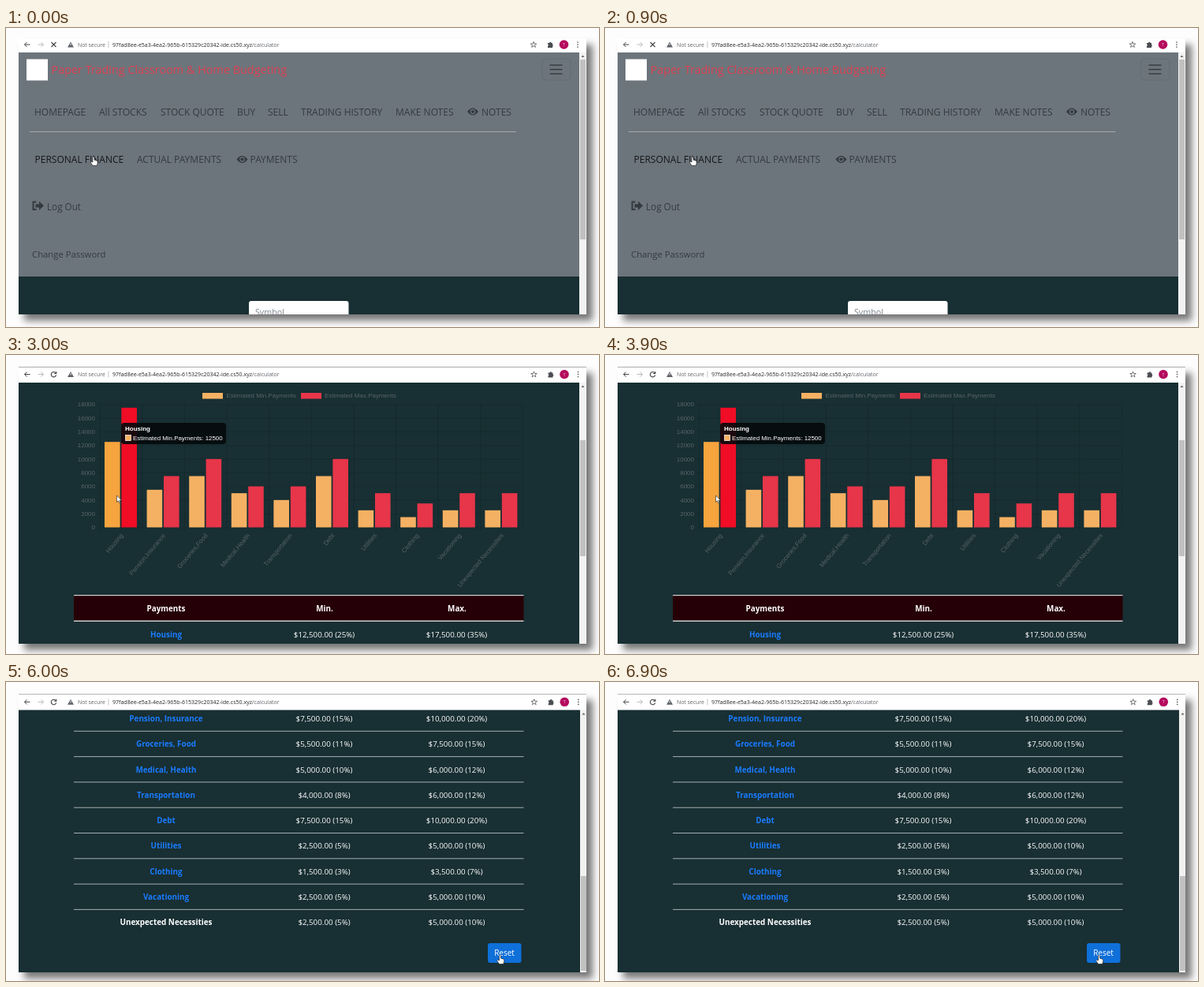
An HTML page that plays this animation: 752 by 379 pixels, repeating every 7.5 s.

```html
<!DOCTYPE html>
<html lang="en">
<head>
<meta charset="utf-8">
<title>Budget calculator walkthrough</title>
<style>
html, body { margin: 0; width: 100%; height: 100%; overflow: hidden; background: #fdfdfd; }
svg { display: block; width: 752px; height: 379px; font-family: "Open Sans", "Noto Sans", sans-serif; }
.scene { visibility: hidden; animation: show 7500ms step-end infinite; }
@keyframes show { 0% { visibility: visible } 20%, 100% { visibility: hidden } }
.chart { font-family: "Liberation Sans", Arial, sans-serif; font-size: 8px; }
.mid { text-anchor: middle; }
.end { text-anchor: end; }
.b { font-weight: 700; }
</style>
</head>
<body>
<svg id="stage" viewBox="0 0 752 379" xmlns="http://www.w3.org/2000/svg"></svg>
<script>
const DARK = '#182f33', GREY = '#6d757c', INK = '#343a40', BLUE = '#1a7cff';

const rect = (x, y, w, h, fill, extra = '') =>
  `<rect x="${x}" y="${y}" width="${w}" height="${h}" fill="${fill}" ${extra}/>`;
const text = (x, y, s, size, fill, cls = '', extra = '') =>
  `<text x="${x}" y="${y}" font-size="${size}" fill="${fill}" class="${cls}" ${extra}>${s}</text>`;
const stroke = (d, color, width = 1, extra = '') =>
  `<path d="${d}" fill="none" stroke="${color}" stroke-width="${width}" ${extra}/>`;
const at = (x, y, s) => `<g transform="translate(${x} ${y})">${s}</g>`;

const arrow = (x, y) => at(x, y,
  '<path d="M0 0V8.5L2 6.8L3.4 10L4.7 9.4L3.4 6.3H6Z" fill="#fff" stroke="#222" stroke-width=".6"/>');
const hand = (x, y) => at(x, y,
  '<path d="M-1 -5.5Q0 -6.6 1 -5.5V-1.8L4.5 -.8Q5.6 0 5.2 2L4.3 5.5H-1L-4 1Q-3.6 -.5 -1 1Z" fill="#fff" stroke="#222" stroke-width=".7"/>');
const eye = (x, y) => at(x, y,
  `<path d="M-7 0Q0 -9 7 0Q0 9 -7 0Z" fill="${INK}"/><circle r="3.2" fill="${GREY}"/><circle r="2.1" fill="${INK}"/>`);

// Browser toolbar: mid is its vertical centre, dx shifts the right-hand icons
function toolbar(mid, dx, loading) {
  const c = '#5f6368';
  const back = 'M3.5 0H-3.5M-.5 -3L-3.5 0L-.5 3';
  const reload = loading ? 'M-3 -3L3 3M3 -3L-3 3' : 'M2.5 -1.8A3.2 3.2 0 1 0 3.1 1M3.3 -3.6V-1H.7';
  return at(0, mid,
    at(27, 0, stroke(back, '#444')) +
    at(44, 0, `<g transform="scale(-1 1)">${stroke(back, '#b9bbbe')}</g>`) +
    at(60.5, 0, stroke(reload, '#444', 1.1)) +
    `<path d="M82 -3.6L86 3.4H78Z" fill="${c}"/>` + rect(81.6, -1.4, .9, 2.4, '#fff') +
    text(91, 2.5, 'Not secure', 6.9, c) + rect(129.6, -4, .7, 8, '#aaa') +
    text(135, 2.5, `97fad8ee-e5a3-4ea2-965b-615329c20342-ide.cs50.xyz<tspan fill="${c}">/calculator</tspan>`, 7.05, '#26282b') +
    at(dx, 0,
      stroke('M669 -3.6L670 -1H672.8L670.6 .7L671.4 3.4L669 1.8L666.6 3.4L667.4 .7L665.2 -1H668Z', '#555', .8) +
      '<path d="M687 -2H689A1.3 1.3 0 0 1 691.6 -2H693V0A1.3 1.3 0 0 1 693 2.4V4H687V2A1.3 1.3 0 0 0 687 -.4Z" fill="#4a4d51"/>' +
      '<circle cx="707.5" r="5.8" fill="#b40a5c"/>' + text(707.5, 2, 'T', 5.5, '#f3c4db', 'mid') +
      [-3, 0, 3].map(y => `<circle cx="725" cy="${y}" r=".85" fill="#555"/>`).join('')));
}

// Window frame: bar top, page top, page bottom, scrollbar thumb range
function page(id, o, body) {
  const { top, y, bottom, thumb, right = 727 } = o;
  return rect(23, top + 8, 721, bottom - top, '#333', 'filter="url(#soft)" opacity=".66"') +
    rect(16, top, 720, bottom - top, '#fff') +
    (o.edge || '') + toolbar(o.mid, o.dx || 0, o.loading) +
    `<clipPath id="p${id}">${rect(16, y, right - 16, bottom - y, '#000')}</clipPath>` +
    rect(16, y, right - 16, bottom - y, DARK) +
    `<g clip-path="url(#p${id})">${body}</g>` +
    rect(right, y, 736 - right, bottom - y, '#f2f2f2') +
    rect(right + 1, thumb[0], 7, thumb[1] - thumb[0], '#c1c1c1') +
    `<path d="M${right + 2.5} ${y + 6}h4l-2 -2.6Z" fill="#666"/>`;
}

function navbar(y, h) {
  const m = y + 21.5;
  return rect(16, y, 712, h, GREY) + rect(26, m - 13, 27, 27, '#fff') +
    text(57.5, m + 5, 'Paper Trading Classroom &amp; Home Budgeting', 14.4, '#dc3f51') +
    rect(680, m - 13.5, 36, 27, 'none', 'rx="4" stroke="#646c73"') +
    [-5.5, 0, 5.5].map(d => rect(689.5, m + d - .6, 16, 1.3, '#30363a')).join('');
}

function menuScene() {
  const item = (x, y, s, color = INK) => text(x, y, s, 12, color);
  const links = [[36, 'HOMEPAGE'], [118, 'All STOCKS'], [196, 'STOCK QUOTE'], [293, 'BUY'], [332, 'SELL'],
    [374, 'TRADING HISTORY'], [494, 'MAKE NOTES'], [603, 'NOTES']];
  return navbar(31, 284) +
    links.map(([x, s]) => item(x, 110.5, s)).join('') + eye(592, 106) +
    rect(30, 131, 617, 1, '#a3a8ac') +
    item(36.5, 171, 'PERSONAL FINANCE', '#14181b') + item(166, 171, 'ACTUAL PAYMENTS') +
    eye(299.5, 166.5) + item(309.5, 171, 'PAYMENTS') +
    stroke('M38.5 220.5H34.5V230H38.5', INK, 2) +
    `<path d="M37.5 223.2H42V219.6L48 225.3L42 231V227.4H37.5Z" fill="${INK}"/>` +
    text(52, 231, 'Log Out', 11.7, INK) + text(33, 290.5, 'Change Password', 11.3, INK) +
    rect(308, 346, 126.5, 26, '#fff', 'rx="3"') + text(316, 364, 'Symbol', 10.7, '#7b838a') +
    hand(111, 169);
}

// Coin pile: each band is [centre x, top, bottom, width]
function coins(bands) {
  const tones = ['#8a7a45', '#b3a36c', '#7a6a3c', '#9a8a5a'];
  const coin = (x, y, w, fill) =>
    rect(x, y, w, 4.6, fill, 'rx="2"') + rect(x, y, w, 4.6, 'url(#metal)', 'rx="2"');
  return bands.map(([cx, top, bottom, w]) => {
    let s = rect(cx - w / 2 + 2, top + 3, w - 4, bottom - top - 4, '#3f3821');
    for (let y = bottom - 5, i = 0; y >= top; y -= 5, i++)
      s += coin(cx - w / 2 + Math.sin(i * 2.3), y, w, tones[i % 4]);
    return s + `<ellipse cx="${cx}" cy="${top + 3}" rx="${w / 2}" ry="3" fill="#9d9162" stroke="#5b5130" stroke-width=".6"/>`;
  }).join('');
}

function photo() {
  let grid = '';
  for (let i = 0; i < 34; i++) grid += `M${172 + i * 13} 298L${20 + i * 21} 364`;
  for (let i = 0; i < 8; i++) grid += `M172 ${300 + i * 3 + i * i * .8}H568`;
  return `<clipPath id="ph">${rect(172, 121, 396, 243, '#000')}</clipPath><g clip-path="url(#ph)">` +
    rect(172, 121, 396, 243, 'url(#paper)') + stroke(grid, '#b8b0a6', .7, 'opacity=".45"') +
    '<ellipse cx="345" cy="336" rx="125" ry="12" fill="url(#shade)"/>' +
    coins([[284, 300, 335, 53], [285, 262, 302, 41], [281, 236, 262, 55],
      [371, 298, 335, 54], [369, 270, 300, 40], [437, 308, 334, 43], [435, 296, 310, 33], [437, 282, 297, 41]]) +
    '<ellipse cx="380" cy="266" rx="20" ry="5.5" fill="#8a7a4a" stroke="#4f4628" transform="rotate(-12 380 266)"/></g>';
}

function formScene() {
  const line = (y, s) => text(370.5, y, s, 10, '#24292d', 'mid');
  return navbar(33, 43) + photo() +
    line(168, "Personal finances and organizing them it's very important task for successful living.") +
    line(184, 'By entering your income amount in the field bellow,') +
    line(200, 'you will get an estimated results of how much your spendings should be.') +
    text(384, 261, 'Enter your income for a month or year :', 9.9, '#212529', 'mid b') +
    rect(319, 274, 129, 26, '#fff', 'rx="4" stroke="#c3dcf5" stroke-width="2.4"') +
    rect(320.5, 275.5, 126, 23, '#fff', 'rx="3" stroke="#8fc3f8" stroke-width=".8"') +
    text(328, 291.5, '50000', 10.1, '#495057') + rect(358, 281, .7, 13, '#666') +
    rect(354, 310, 59, 26, '#0f70da', 'rx="3"') + text(362, 327, 'Calculate', 10.1, '#fff') + hand(392, 331);
}

// name, lowest and highest share of the income in percent
const income = 50000;
const budget = [['Housing', 25, 35], ['Pension, Insurance', 15, 20], ['Groceries, Food', 11, 15],
  ['Medical, Health', 10, 12], ['Transportation', 8, 12], ['Debt', 15, 20], ['Utilities', 5, 10],
  ['Clothing', 3, 7], ['Vacationing', 5, 10], ['Unexpected Necessities', 5, 10]];
const money = p => `$${(income * p / 100).toLocaleString('en-US')}.00 (${p}%)`;
const rule = y => rect(86, y - .5, 570.5, 1, '#a3aeb0');

function header(y) {
  const cell = (x, s) => text(x, y + 20, s, 9.9, '#fff', 'mid b');
  return rect(86, y, 570.5, 32.5, '#260007') + rect(86, y - .5, 570.5, 1.2, '#cfd3d4') +
    rect(86, y + 32, 570.5, 1.4, '#d8dcdd') + cell(203, 'Payments') + cell(404, 'Min.') + cell(572, 'Max.');
}

// Rows from index first on; y is the centre of the first one
function rows(y, first, hover = -1) {
  return budget.slice(first).map(([name, lo, hi], i) => {
    const n = first + i, c = y + i * 32.3, last = n === 9;
    const color = last ? '#fff' : n === hover ? '#1761bd' : BLUE;
    return text(203, c + 3.6, name, 9.9, color, 'mid b', n === hover ? 'text-decoration="underline"' : '') +
      text(403.5, c + 3.6, money(lo), 9.8, '#fff', 'mid') + text(571.5, c + 3.6, money(hi), 9.8, '#fff', 'mid') +
      (last ? '' : rule(c + 16));
  }).join('');
}

function chartScene() {
  const base = 218.5, step = 53.6, perUnit = 156 / 18000, dim = '#596568';
  let s = '';
  for (let v = 0; v <= 18000; v += 2000) {
    const y = base - v * perUnit;
    s += rect(117, y, 537, .7, '#122528', 'opacity=".6"') + text(113, y + 2.8, v, 8, dim, 'end');
  }
  for (let i = 0; i <= 10; i++) s += rect(119 + i * step, 62, .7, 161, '#122528', 'opacity=".6"');
  budget.forEach(([name, lo, hi], i) => {
    // the chart lists the two shares of pension and groceries the other way round
    if (i === 1) [lo, hi] = [11, 15];
    if (i === 2) [lo, hi] = [15, 20];
    const x = 125 + i * step;
    const bar = (bx, p, fill) => {
      const h = income * p / 100 * perUnit;
      return rect(bx, base - h, 19.6, h, fill);
    };
    s += bar(x, lo, i ? '#f5b163' : '#f5a43e') + bar(x + 21.4, hi, i ? '#e73549' : '#f00d25') +
      text(0, 0, name.replace(', ', ','), 8, dim, 'end', `transform="translate(${x + 24} 229) rotate(-50)"`);
  });
  s += rect(249, 48, 26, 7.5, '#f5b163') + text(279.5, 54.3, 'Estimated Min.Payments', 8, dim) +
    rect(374, 48, 26, 7.5, '#e73549') + text(404, 54.3, 'Estimated Max.Payments', 8, dim) +
    rect(146, 86, 133, 27, '#05090a', 'rx="4" opacity=".9"') +
    text(151, 96.3, 'Housing', 8, '#fff', 'b') +
    rect(151.5, 101.5, 7, 7, '#f5b163', 'stroke="#fff" stroke-width=".7"') +
    text(161, 108, 'Estimated Min.Payments: 12500', 7.9, '#fff');
  return `<g class="chart">${s}</g>` + arrow(140.5, 178) + header(304.5) + rows(354.3, 0);
}

function tableScene() {
  const tip = (y, s) => text(177, y, s, 9.8, '#111', 'mid b');
  return header(43) + rows(92, 0, 6) +
    rect(101, 294.5, 151, 36.5, '#ffffaf') +
    tip(309.3, 'Payments for electricity,cable') + tip(325, 'water,phone.') + arrow(202.5, 334);
}

function resetScene() {
  return rows(46.3, 1) + rect(611, 331, 42.5, 25, '#0f70da', 'rx="3"') +
    text(632, 347.3, 'Reset', 10, '#fff', 'mid') + hand(626.5, 352);
}

const topLine = (y, color) => rect(16, y, 720, 1, color);
const scenes = [
  [{ top: 13, mid: 21, y: 31, bottom: 363, thumb: [40, 268], loading: true }, menuScene],
  [{ top: 14, mid: 22.3, y: 33, bottom: 364, thumb: [42, 346], right: 726, dx: -1 }, formScene],
  [{ top: 15, mid: 24.5, y: 35, bottom: 366, thumb: [108, 255], dx: .5, edge: topLine(14.8, '#aaa') }, chartScene],
  [{ top: 16, mid: 27, y: 37.5, bottom: 367, thumb: [216, 366], edge: topLine(15.5, '#aaa') + rect(400, 15, 336, 2, '#222') }, tableScene],
  [{ top: 15, mid: 25.3, y: 35.5, bottom: 368, thumb: [246, 366], dx: .8, right: 728, edge: topLine(15, '#bbb') }, resetScene]
];

document.getElementById('stage').innerHTML =
  `<defs><filter id="soft" x="-5%" y="-10%" width="110%" height="120%"><feGaussianBlur stdDeviation="4.6"/></filter>
  <linearGradient id="paper" x2="0" y2="1"><stop stop-color="#fff"/><stop offset=".6" stop-color="#fafaf9"/>
  <stop offset=".76" stop-color="#e9e5e1"/><stop offset="1" stop-color="#d9d3cc"/></linearGradient>
  <radialGradient id="shade"><stop stop-color="#8f8468" stop-opacity=".7"/><stop offset="1" stop-color="#8f8468" stop-opacity="0"/></radialGradient>
  <linearGradient id="metal"><stop stop-color="#2f2814" stop-opacity=".5"/><stop offset=".3" stop-color="#fff3c4" stop-opacity=".55"/>
  <stop offset=".6" stop-color="#2f2814" stop-opacity=".1"/><stop offset="1" stop-color="#2f2814" stop-opacity=".65"/></linearGradient></defs>` +
  rect(0, 0, 752, 379, '#fdfdfd') +
  scenes.map(([frame, draw], i) =>
    `<g class="scene" style="animation-delay:${i * 1500 - 7500}ms">${page(i, frame, draw())}</g>`).join('');
</script>
</body>
</html>
```
